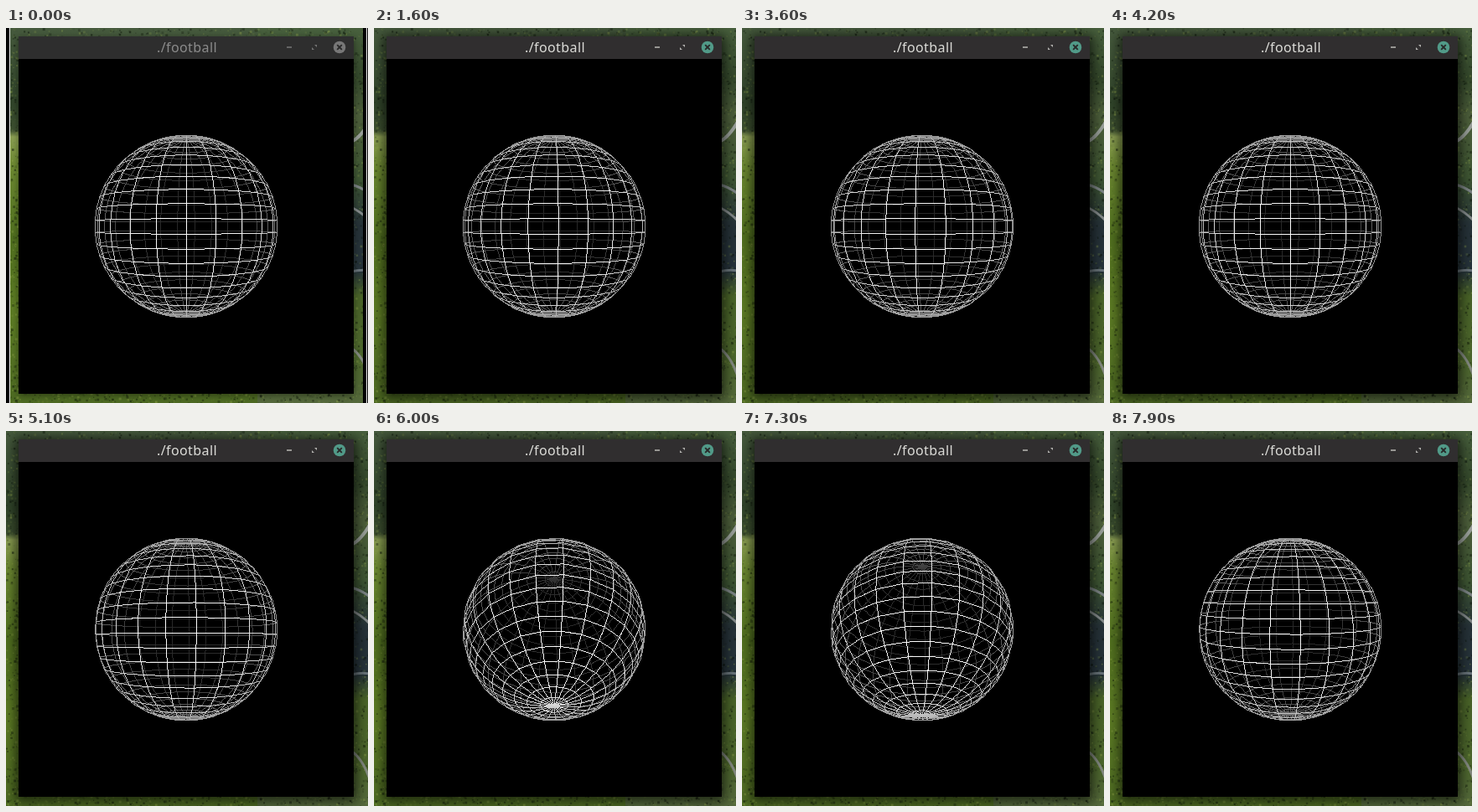
An HTML page with a canvas that plays this animation: 432 px wide and 448 px high, repeating every 8000 ms.

```html
<!DOCTYPE html>
<html lang="en">
<head>
<meta charset="utf-8">
<title>Wireframe ball</title>
<style>
  html, body { margin: 0; width: 100%; height: 100%; overflow: hidden; background: #000; }
  #stage { position: relative; width: 432px; height: 448px; overflow: hidden; }
  #wall { position: absolute; left: 0; top: 0; }
  .edge { position: absolute; top: 0; height: 448px; background: #000; display: none; }
  .edge i { position: absolute; top: 0; width: 1px; height: 448px; background: #f4f4f4; }
  .picking .edge { display: block; }
  #win {
    position: absolute; left: 15px; top: 10px; width: 400px; height: 427px;
    background: #000; box-shadow: 0 2px 8px rgba(0, 0, 0, .45);
  }
  #bar { position: absolute; width: 400px; height: 27px; background: #2e2e2e; color: #8b8b8b; }
  #title {
    position: absolute; left: 1px; width: 400px; top: 0; line-height: 27px; text-align: center;
    font: 500 16px/27px "Noto Sans", "Open Sans", sans-serif; letter-spacing: .4px;
  }
  #bar svg { position: absolute; left: 316px; top: 0; }
  #bar circle { fill: #777; }
  .focus #win { box-shadow: 0 2px 13px 4px rgba(0, 0, 0, .62); }
  .focus #bar { background: #302e2f; color: #dcdcd8; }
  .focus #bar circle { fill: #519a88; }
  #ball { position: absolute; left: 0; top: 27px; }
</style>
</head>
<body>
<div id="stage">
  <canvas id="wall" width="432" height="448"></canvas>
  <div class="edge" style="left:0;width:5px"><i style="left:4px"></i></div>
  <div class="edge" style="left:426px;width:6px"><i style="left:4px"></i></div>
  <div id="win">
    <div id="bar">
      <div id="title">./football</div>
      <svg width="84" height="27">
        <path d="M4 13h6" stroke="currentColor" stroke-width="1.6" opacity=".75"/>
        <path d="M37 10h3v3zM34 13v3h3z" fill="currentColor" opacity=".75"/>
        <circle cx="67" cy="13" r="7.3"/>
        <path d="M64.2 10.2l5.6 5.6m0-5.6l-5.6 5.6" stroke="#282828" stroke-width="1.9"/>
      </svg>
    </div>
    <canvas id="ball" width="400" height="400"></canvas>
  </div>
</div>
<script>
const stage = document.getElementById('stage');
const rad = Math.PI / 180;

// Wallpaper: wooded slopes with a winding road on the right
function paintWall() {
  const g = document.getElementById('wall').getContext('2d');
  let seed = 7;
  const rnd = () => (seed = (seed * 16807) % 2147483647) / 2147483647;
  const strip = (x, y, w, h, stops) => {
    const grad = g.createLinearGradient(0, 0, 0, 448);
    stops.forEach(([at, color]) => grad.addColorStop(at / 448, color));
    g.fillStyle = grad;
    g.fillRect(x, y, w, h);
  };
  strip(0, 0, 300, 448, [[0, '#465a3d'], [90, '#31452a'], [122, '#3d5030'], [130, '#8b9f52'],
    [165, '#6d8a31'], [250, '#51701f'], [340, '#5d7c24'], [448, '#4d6a22']]);
  strip(300, 0, 132, 448, [[0, '#48603d'], [60, '#34482b'], [105, '#4d5f3b'], [180, '#3e5633'],
    [235, '#263238'], [290, '#26333a'], [320, '#496328'], [400, '#4d672d'], [448, '#55693c']]);
  for (let i = 0; i < 9000; i++) {
    const x = rnd() * 432, y = rnd() * 448, s = 1 + rnd() * 2;
    g.fillStyle = rnd() < .6 ? `rgba(8,16,6,${rnd() * .5})` : `rgba(165,185,85,${rnd() * .35})`;
    g.fillRect(x, y, s, s);
  }
  const road = (color, width, ...p) => {
    g.strokeStyle = color;
    g.lineWidth = width;
    g.beginPath();
    g.moveTo(p[0], p[1]);
    g.quadraticCurveTo(p[2], p[3], p[4], p[5]);
    g.stroke();
  };
  road('#9aa09a', 4, 412, 136, 424, 130, 434, 112);
  road('#7c8484', 3, 412, 187, 424, 190, 434, 198);
  road('#858b8b', 3, 412, 214, 424, 220, 434, 230);
  road('#69747a', 3, 412, 291, 424, 288, 434, 290);
  road('#858b82', 3, 412, 382, 426, 392, 434, 416);
}

// Held key: one step on press, then a repeat every 30 ms after a 500 ms delay
function presses(t, start, lead, max) {
  if (t < start) return 0;
  if (t < start + 500) return 1;
  return Math.min(max, 2 + Math.floor((t - start - 500 + lead) / 30));
}

const N = 25, DIST = 3.5, FOCAL = 365.6, STEP = 2;
const g = document.getElementById('ball').getContext('2d');

function vertex(row, col, spin, tilt) {
  const lat = (row / N - .5) * Math.PI;
  const lon = col / N * 2 * Math.PI + spin * rad;
  const x = Math.cos(lat) * Math.sin(lon);
  const y0 = Math.sin(lat), z0 = Math.cos(lat) * Math.cos(lon);
  const c = Math.cos(tilt * rad), s = Math.sin(tilt * rad);
  const y = y0 * c - z0 * s, z = y0 * s + z0 * c;
  const k = FOCAL / (DIST - z);
  return { x: 200 + x * k, y: 200 + y * k, z };
}

// Hard one-pixel line, shaded by depth
function line(a, b) {
  const n = Math.max(1, Math.ceil(Math.max(Math.abs(b.x - a.x), Math.abs(b.y - a.y))));
  const v = Math.round(40 + 215 * Math.pow(Math.max(0, (a.z + b.z) / 4 + .5), 1.5));
  g.fillStyle = `rgb(${v},${v},${v})`;
  for (let i = 0; i <= n; i++) {
    const u = i / n;
    g.fillRect(Math.floor(a.x + (b.x - a.x) * u), Math.floor(a.y + (b.y - a.y) * u), 1, 1);
  }
}

function drawBall(spin, tilt) {
  const grid = [];
  for (let r = 0; r <= N; r++) {
    grid.push(Array.from({ length: N }, (_, c) => vertex(r, c, spin, tilt)));
  }
  const lines = [];
  for (let r = 0; r < N; r++) {
    for (let c = 0; c < N; c++) {
      lines.push([grid[r][c], grid[r + 1][c]]);
      if (r) lines.push([grid[r][c], grid[r][(c + 1) % N]]);
    }
  }
  lines.sort((p, q) => p[0].z + p[1].z - q[0].z - q[1].z);
  g.fillStyle = '#000';
  g.fillRect(0, 0, 400, 400);
  lines.forEach(([a, b]) => line(a, b));
}

let shown = '';
function frame() {
  const t = Math.floor(performance.now() % 8000 / 100) * 100;
  const spin = STEP * (presses(t, 1600, 75, 27) - presses(t, 3000, 75, 39));
  const tilt = STEP * (presses(t, 4900, 45, 32) - presses(t, 6500, 95, 99));
  stage.className = t < 100 ? 'picking' : t < 1300 ? '' : 'focus';
  const pose = spin + ',' + tilt;
  if (pose !== shown) {
    drawBall(spin, tilt);
    shown = pose;
  }
  requestAnimationFrame(frame);
}

paintWall();
frame();
</script>
</body>
</html>
```
